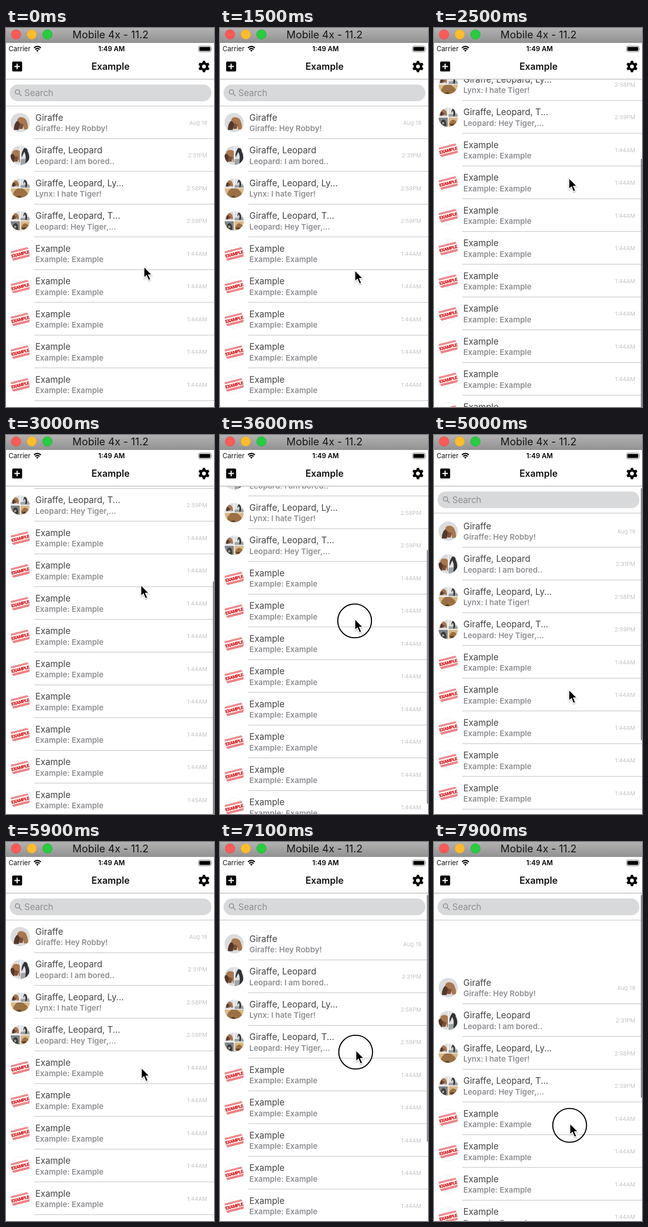
Animation, 404 px wide and 735 px high, one loop 8000 ms. Source, as an HTML page:

```html
<!DOCTYPE html>
<html lang="en">
<head>
<meta charset="utf-8">
<title>Chat list</title>
<style>
  html, body { margin: 0; width: 100%; height: 100%; overflow: hidden; background: #fff; }
  svg { display: block; }
  text { font-family: Inter, Roboto, sans-serif; }
  .name { font-size: 17px; fill: #444; }
  .last { font-size: 15px; font-weight: 600; fill: #8e8e93; }
  .time { font-size: 11px; fill: #c4c4c8; text-anchor: end; }
  .mid { text-anchor: middle; }
  .stamp { font: 900 8.6px Roboto, sans-serif; letter-spacing: -.5px; fill: #e0262b; stroke: #e0262b; stroke-width: .3; }
</style>
</head>
<body>
<svg id="stage" width="404" height="735" viewBox="0 0 404 735">
  <defs>
    <linearGradient id="chrome" x2="0" y2="1">
      <stop offset="0" stop-color="#b3b2b3"/><stop offset="1" stop-color="#929192"/>
    </linearGradient>
    <clipPath id="round"><circle r="18.7"/></clipPath>
    <filter id="shade" x="-50%" y="-30%" width="200%" height="170%">
      <feDropShadow dx="0" dy="1.5" stdDeviation="1.3" flood-opacity=".35"/>
    </filter>
    <g id="ape">
      <path fill="#dbdcdd" d="M0 0H40V40H0Z"/>
      <path fill="#a8774f" d="M14 15Q16 8 23 9Q32 10 34 19Q37 27 36 34H28L26 25L20 24Z"/>
      <path fill="#54372b" d="M14 16Q18 18 20 24L17 35H7Q7 22 14 16Z"/>
      <path fill="#7c4f35" d="M20 21L27 24L25 33H18Z"/>
    </g>
    <g id="bird">
      <path fill="#dfe1e3" d="M0 0H40V40H0Z"/>
      <path fill="#9fa4a8" d="M0 29L40 25V40H0Z"/>
      <path fill="#303236" d="M18 5Q25 4 25 12Q31 22 26 37H20Q23 21 18 13L13 24Q11 15 18 5Z"/>
    </g>
    <g id="cat">
      <path fill="#d9b98a" d="M0 0H40V40H0Z"/>
      <path fill="#9b7144" d="M4 28Q7 10 20 9Q34 12 38 27L24 36Z"/>
      <path fill="#5b4029" d="M3 24Q9 30 20 25L26 35H8Z"/>
    </g>
    <g id="swimmer">
      <path fill="#7d8587" d="M0 0H40V40H0Z"/>
      <path fill="#3b3835" d="M9 40Q7 12 22 8Q36 12 32 40Z"/>
      <path fill="#a69a8c" d="M15 22Q20 15 26 22L23 29H17Z"/>
    </g>
  </defs>
  <rect width="404" height="735" fill="#fff"/>
  <g id="rows"></g>
  <g id="search">
    <rect x="7" y="109.5" width="392" height="32.5" rx="16.2" fill="#d8d9db"/>
    <g fill="none" stroke="#88898d" stroke-width="1.6">
      <circle cx="22.3" cy="124" r="4.3"/><path d="M25.5 127.2L30.3 132"/>
    </g>
    <text x="35.5" y="132" font-size="17" fill="#8e8e93">Search</text>
    <path d="M0 151.5H404" stroke="#cfcfd1" stroke-width="1.6"/>
  </g>
  <rect id="bar" x="401.8" width="2.6" rx="1.3" fill="#858587"/>
  <rect y="28" width="404" height="71" fill="#fff"/>
  <path d="M0 99.3H404" stroke="#bdbdbf" stroke-width="1.5"/>
  <rect width="404" height="29" fill="url(#chrome)"/>
  <g stroke-width=".6">
    <circle cx="19.5" cy="12.5" r="9.4" fill="#fc5b57" stroke="#df4744"/>
    <circle cx="50" cy="12.5" r="9.4" fill="#fdbc2e" stroke="#dea123"/>
    <circle cx="80.5" cy="12.5" r="9.4" fill="#29cb41" stroke="#1dad2b"/>
  </g>
  <text class="mid" x="203" y="20" font-size="20" fill="#151515">Mobile 4x - 11.2</text>
  <text x="5" y="45.3" font-size="13" fill="#111">Carrier</text>
  <g fill="none" stroke="#000" stroke-width="2.2">
    <path d="M54.3 38.6Q61 32.6 67.7 38.6M56.8 41.6Q61 37.8 65.2 41.6"/>
  </g>
  <path d="M58.6 43.4Q61 41.4 63.4 43.4L61 46Z"/>
  <text class="mid" x="205" y="45.3" font-size="13" font-weight="600">1:49 AM</text>
  <rect x="373.8" y="35" width="24.6" height="11.2" rx="2.8" fill="none" stroke="#777"/>
  <rect x="375.5" y="36.7" width="21.2" height="7.8" rx="1.4"/>
  <path d="M399.6 38.8Q401.3 40.6 399.6 42.4Z" fill="#777"/>
  <rect x="12" y="65" width="19.3" height="19.3" rx="2.6"/>
  <path d="M21.6 69.3V80M16.3 74.6H27" stroke="#fff" stroke-width="2.2"/>
  <text class="mid" x="203" y="81" font-size="18" font-weight="600" fill="#111">Example</text>
  <g id="gear" transform="translate(384.5 74.7)">
    <circle r="6" fill="none" stroke="#000" stroke-width="4.6"/>
  </g>
  <circle id="ring" r="32.8" fill="none" stroke="#000" stroke-width="2.1"/>
  <path id="cursor" d="M0 0V21.5L4.9 17L8.9 26.2L12.8 24.5L8.8 15.6H15.4Z" stroke="#fff" stroke-width="1.4" filter="url(#shade)"/>
</svg>
<script>
const LOOP = 8000, STEP = 100, PITCH = 63.5, TOP = 151.5, MAX = 228;
const $ = id => document.getElementById(id);

// Photo tile: kind, x, y, width, height around the avatar centre
const tile = (kind, x, y, w, h) =>
  `<svg x="${x}" y="${y}" width="${w}" height="${h}" viewBox="0 0 40 40" preserveAspectRatio="xMidYMid slice"><use href="#${kind}"/></svg>`;
const A = -19, B = .6, H = 18.4;
const avatars = [
  tile('ape', A, A, 38, 38),
  tile('ape', A, A, H, 38) + tile('bird', B, A, H, 38),
  tile('ape', A, A, H, H) + tile('bird', B, A, H, H) + tile('cat', A, B, 38, H),
  tile('ape', A, A, H, H) + tile('bird', B, A, H, H) + tile('swimmer', A, B, H, H) + tile('cat', B, B, H, H)
];
const stamp = `<circle r="18.3" fill="#fff" stroke="#eee"/>
  <g transform="rotate(-14)"><text class="stamp mid" y="3.8">EXAMPLE</text>
  <path d="M-17 -7.8H18M-17 -5.8H18M-18 6.7H18M-17 9H17" stroke="#e0262b" stroke-width="1.1"/></g>`;

const chats = [
  ['Giraffe', 'Giraffe: Hey Robby!', 'Aug 19'],
  ['Giraffe, Leopard', 'Leopard: I am bored..', '2:31PM'],
  ['Giraffe, Leopard, Ly...', 'Lynx: I hate Tiger!', '2:58PM'],
  ['Giraffe, Leopard, T...', 'Leopard: Hey Tiger,...', '2:59PM']
];
for (let i = 4; i < 13; i++) chats.push(['Example', 'Example: Example', i < 12 ? '1:44AM' : '1:45AM']);

$('rows').innerHTML = chats.map(([name, last, time], i) =>
  `<g transform="translate(0 ${TOP + i * PITCH})">
    <g transform="translate(27.5 32)" clip-path="url(#round)">${avatars[i] || stamp}</g>
    <text class="name" x="57" y="28.3">${name}</text>
    <text class="last" x="57" y="48.6">${last}</text>
    <text class="time" x="391" y="36.4">${time}</text>
    <path d="M55 63.2H404" stroke="#c8c7cc" stroke-width="1.3"/>
  </g>`).join('');

for (let a = 0; a < 360; a += 60)
  $('gear').innerHTML += `<path d="M-3 -7L-2.2 -11H2.2L3 -7Z" transform="rotate(${a})"/>`;

// Tables of [ms, value]
const scroll = [[1900, 0], [2000, -30], [2300, -168], [2500, -201], [2700, -222], [3000, -238], [3300, -230],
  [3400, -228], [3600, -160], [3900, -15], [4000, 45], [4100, 75], [4200, 72], [4400, 44], [4600, 21],
  [4800, 9], [5000, 3], [5300, 0], [6800, 0], [7100, 14], [7500, 58], [7900, 99]];
const tipX = [[100, 268], [800, 262], [5500, 262], [6300, 264]];
const tipY = [[100, 463], [800, 470], [1900, 470], [2000, 440], [2300, 291], [3400, 291], [3600, 357],
  [3900, 494], [5500, 494], [6300, 382], [6800, 382], [7100, 404], [7900, 546]];
const barFade = [[1800, 0], [1900, 1], [5200, 1], [5600, 0], [6800, 0], [6900, 1]];
const presses = [[1900, 2300], [3400, 3900], [6700, 8000]];

function at(keys, t) {
  const i = keys.findIndex(k => k[0] > t);
  if (i === 0) return keys[0][1];
  if (i < 0) return keys[keys.length - 1][1];
  const [t0, v0] = keys[i - 1], [t1, v1] = keys[i];
  return v0 + (v1 - v0) * (t - t0) / (t1 - t0);
}
const move = (id, x, y) => $(id).setAttribute('transform', `translate(${x} ${y})`);

function draw(now) {
  const t = Math.floor(now % LOOP / STEP) * STEP;
  const s = at(scroll, t), x = at(tipX, t), y = at(tipY, t);
  move('rows', 0, s);
  move('search', 0, Math.min(s, 0));
  move('cursor', x, y);
  move('ring', x - .5, y + 3.5);
  $('ring').style.opacity = presses.some(([a, b]) => t >= a && t < b) ? 1 : 0;

  // The indicator shrinks when the list is pulled past either end
  const over = Math.max(-s - MAX, 0), inside = Math.min(Math.max(-s, 0), MAX);
  $('bar').setAttribute('y', 103 + inside * .75 + over);
  $('bar').setAttribute('height', 492 - Math.max(s, 0) - over);
  $('bar').style.opacity = at(barFade, t);
}

const start = performance.now();
function tick() {
  draw(performance.now() - start);
  requestAnimationFrame(tick);
}
tick();
</script>
</body>
</html>
```
